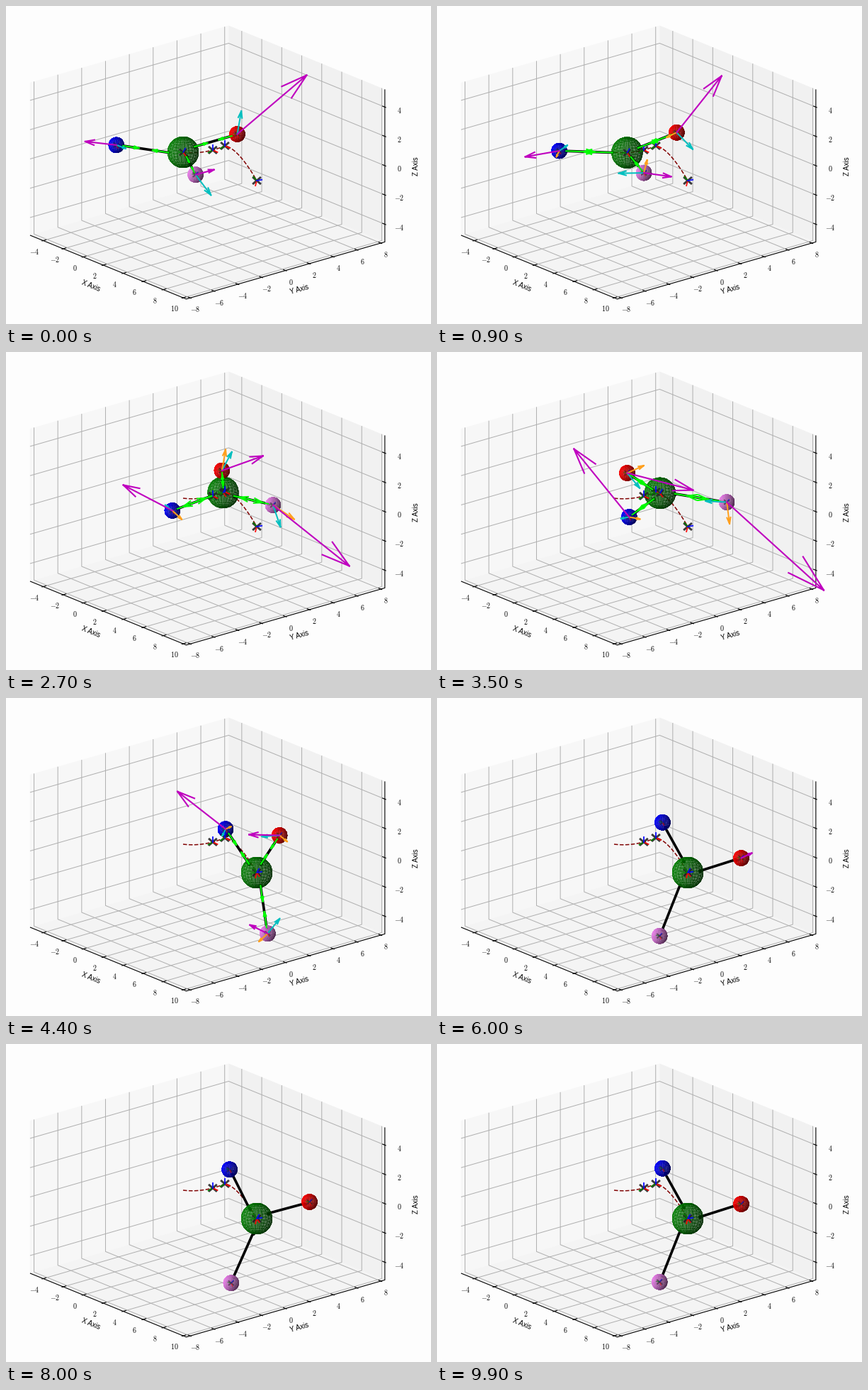
These frames come from a looping animation (600x448 px, 10 s). A matplotlib script:

```python
import numpy as np
import matplotlib.pyplot as plt
from matplotlib.animation import FuncAnimation
from matplotlib.collections import LineCollection, PolyCollection
from matplotlib.colors import to_rgb

W, H, DPI = 600, 448, 64
PT = 72 / DPI                      # points per pixel
FRAMES, STEP = 100, 100

plt.rcParams["mathtext.fontset"] = "cm"
fig = plt.figure(figsize=(W / DPI, H / DPI), dpi=DPI, facecolor="#fdfdfd")
ax = fig.add_axes([0, 0, 1, 1])
ax.set_xlim(0, W)
ax.set_ylim(H, 0)
ax.axis("off")

# Orthographic view, elevation 20, azimuth -40
SCALE = 21.96
CENTER = np.array([284.4, 220.2])
SE, CE = np.sin(np.radians(20)), np.cos(np.radians(20))
SA, CA = np.sin(np.radians(40)), np.cos(np.radians(40))


def screen(x, y, z):
    u = SA * x + CA * y
    v = SE * (CA * x - SA * y) - CE * z
    return SCALE * np.stack([u, v], axis=-1)


def project(x, y, z):
    return CENTER + screen(np.float64(x) - 2.5, np.float64(y), np.float64(z))


def track(times, values):
    """Smooth monotone curve through key values."""
    k, v = np.array(times, float), np.array(values, float)
    v = v.reshape(len(k), -1)
    d = np.diff(v, axis=0) / np.diff(k)[:, None]
    p = d[:-1] * d[1:]
    m = np.zeros_like(v)
    m[1:-1] = np.where(p > 0, 2 * p / np.where(p > 0, d[:-1] + d[1:], 1), 0)

    def at(t):
        i = int(np.clip(np.searchsorted(k, t, "right") - 1, 0, len(k) - 2))
        h = k[i + 1] - k[i]
        s = np.clip((t - k[i]) / h, 0, 1)
        return ((1 + 2 * s) * (1 - s) ** 2 * v[i] + s * (1 - s) ** 2 * h * m[i]
                + s * s * (3 - 2 * s) * v[i + 1] + s * s * (s - 1) * h * m[i + 1])

    return at


def rotate(vec, angle):
    c, s = np.cos(angle), np.sin(angle)
    return np.array([c * vec[0] - s * vec[1], s * vec[0] + c * vec[1]])


# Box, grid, ticks and labels; limits get a margin of 1/48
X0, X1 = -5 - 15 / 48, 10 + 15 / 48
Y0, Y1 = -8 - 16 / 48, 8 + 16 / 48
Z0, Z1 = -5 - 10 / 48, 5 + 10 / 48
XT, YT, ZT = range(-4, 11, 2), range(-8, 9, 2), range(-4, 5, 2)


def pane(corners, grey):
    pts = [project(*c) for c in corners]
    ax.add_patch(plt.Polygon(pts, fc=(grey,) * 3 + (0.5,), ec="none", zorder=0))


pane([(X0, Y0, Z0), (X0, Y1, Z0), (X0, Y1, Z1), (X0, Y0, Z1)], 0.95)
pane([(X0, Y1, Z0), (X1, Y1, Z0), (X1, Y1, Z1), (X0, Y1, Z1)], 0.90)
pane([(X0, Y0, Z0), (X1, Y0, Z0), (X1, Y1, Z0), (X0, Y1, Z0)], 0.925)

grid = [[(x, Y0, Z0), (x, Y1, Z0), (x, Y1, Z1)] for x in XT]
grid += [[(X1, y, Z0), (X0, y, Z0), (X0, y, Z1)] for y in YT]
grid += [[(X0, Y0, z), (X0, Y1, z), (X1, Y1, z)] for z in ZT]
ticks = [[(x, Y0 - 0.13, Z0), (x, Y0 + 0.27, Z0)] for x in XT]
ticks += [[(X1 + 0.13, y, Z0), (X1 - 0.26, y, Z0)] for y in YT]
ticks += [[(X1 + 0.13, Y1, z), (X1 - 0.26, Y1, z)] for z in ZT]
edges = [[(X0, Y0, Z0), (X1, Y0, Z0), (X1, Y1, Z0), (X1, Y1, Z1)]]
for lines, color, width in ((grid, "#b0b0b0", 1), (ticks + edges, "black", 1.1)):
    ax.add_collection(LineCollection([[project(*p) for p in l] for l in lines],
                                     colors=color, linewidths=width * PT, zorder=1))


def label(pos, text, size, **kw):
    ax.text(*pos, text, fontsize=size * PT, ha="center", va="center", **kw)


for x in XT:
    label(project(x, Y0, Z0) + (-12, 15.2), f"${x}$", 10)
for y in YT:
    label(project(X1, y, Z0) + (7.3, 16), f"${y}$", 10)
for z in ZT:
    label(project(X1, Y1, z) + (20, 4.3), f"${z}$", 10)
for pos, name, turn in (((120, 394), "X", -22), ((414, 399), "Y", 16), ((579.5, 225.5), "Z", 90)):
    label(pos, name + " Axis", 9.7, rotation=turn, family="Liberation Sans")


def path(q):
    """Planned route: a gentle arc for q in 0..1, then a drop for q in 1..2."""
    if q <= 1:
        return np.array([250 + 59 * q, 206 + 7 * q - 16 * q * q])
    r = q - 1
    return np.array([309 + 45 * r, 197 + 49 * r ** 1.6])


ax.plot(*np.transpose([path(q) for q in np.linspace(0, 2, 120)]), "--",
        color="#800000", lw=1.5 * PT, zorder=2)


class Cross:
    """Dark X with a small red, green and blue triad."""

    def __init__(self, size, turn=0, alpha=0.9):
        self.size = size
        self.body, = ax.plot([], [], color="#262626", lw=0.6 * size * PT, zorder=6, alpha=alpha)
        self.axes = [rotate((1.5 * size, 0), np.radians(a + turn)) for a in (25, 150, 270)]
        self.triad = [ax.plot([], [], color=c, lw=0.4 * size * PT, zorder=7, alpha=alpha)[0]
                      for c in ("red", "green", "blue")]

    def move(self, c):
        s = self.size
        self.body.set_data(c[0] + s * np.array([-1, 1, np.nan, -1, 1]),
                           c[1] + 0.85 * s * np.array([-1, 1, np.nan, 1, -1]))
        for line, d in zip(self.triad, self.axes):
            line.set_data([c[0], c[0] + d[0]], [c[1], c[1] + d[1]])


for q, turn in ((0.71, 0), (1, 0), (2, 80)):
    Cross(4.8, turn).move(path(q))


class Ball:
    """Translucent shaded sphere."""
    u, v = np.meshgrid(np.linspace(0, 2 * np.pi, 25), np.linspace(0, np.pi, 17))
    grid = np.stack([np.cos(u) * np.sin(v), np.sin(u) * np.sin(v), np.cos(v)], axis=-1)
    quads = np.stack([grid[:-1, :-1], grid[1:, :-1], grid[1:, 1:], grid[:-1, 1:]], axis=2)
    quads = quads.reshape(-1, 4, 3)
    mid = quads.mean(axis=1)
    order = np.argsort(mid @ [CE * CA, -CE * SA, SE])
    quads, mid = quads[order], mid[order]
    shade = 0.65 + 0.35 * (mid @ [-2 / 3, -2 / 3, 1 / 3])
    flat = screen(quads[..., 0], quads[..., 1], quads[..., 2])

    def __init__(self, radius, color):
        self.verts = self.flat * radius
        rgb = self.shade[:, None] * np.array(to_rgb(color))
        self.mesh = PolyCollection(self.verts, facecolors=np.c_[rgb, np.full(len(rgb), 0.42)],
                                   edgecolors="none", linewidths=0, antialiaseds=False, zorder=4)
        ax.add_collection(self.mesh)

    def move(self, c):
        self.mesh.set_verts(self.verts + c)


class Arrow:
    SPREAD = np.radians(16)

    def __init__(self, color, width, zorder):
        self.line, = ax.plot([], [], color=color, lw=width * PT, zorder=zorder)

    def set(self, tail, vec):
        if np.hypot(*vec) < 3:
            self.line.set_data([], [])
            return
        tip, gap = tail + vec, (np.nan, np.nan)
        left, right = (tip - 0.3 * rotate(vec, a) for a in (self.SPREAD, -self.SPREAD))
        self.line.set_data(*np.transpose([tail, tip, gap, left, tip, right]))


def spin(length, start, rate, t):
    """Arrow that turns steadily; angles in degrees."""
    return rotate((length, 0), np.radians(start + rate * t))


KEYS = (0, 1.9, 3.5, 4.4, 6)       # start, two way points, arrival, rest
progress = track(KEYS, (0, 0.81, 1.13, 2, 2))
fade = track((0, 4.4, 5.6), (1, 0.75, 0))
calm = track((0, 3.9, 5.6), (1, 1, 0))


class Agent:
    """Hangs on the load by a cable; offsets and forces are given at KEYS."""

    def __init__(self, color, offsets, forces, cyan, orange):
        self.offset = track(KEYS, offsets)
        self.force = track(KEYS + (7.5,), forces + [(0, 0)])
        self.spins = cyan, orange
        self.cable, = ax.plot([], [], "o-", color="black", lw=3.6 * PT, ms=4.8 * PT,
                              mew=0, zorder=3)
        self.ball = Ball(0.5, color)
        self.cross = Cross(3.2, 40, 0.6)
        self.pull = [Arrow("lime", 2, 8) for _ in range(2)]
        self.cyan = Arrow("#00bfbf", 2, 9)
        self.orange = Arrow("#ffa01e", 2, 9)
        self.magenta = Arrow("#bf00bf", 2.1, 10)

    def move(self, t, load, sway):
        arm = rotate(self.offset(t), 0.02 * sway)
        c, end = load + arm, load + 0.9 * arm
        hook = load + 0.22 * rotate(arm, 0.13 * sway)
        self.cable.set_data(*np.transpose([hook, end]))
        self.ball.move(c)
        self.cross.move(c)
        share = calm(t) * (0.35 + 0.5 * np.sin(np.pi * t / 4.8))
        self.pull[0].set(hook, share * (end - hook))
        self.pull[1].set(end, share * (hook - end))
        cyan, orange = self.spins
        self.cyan.set(c, fade(t) * spin(*cyan, t))
        self.orange.set(c, max(0, np.sin(np.pi * min(t / 5.2, 1))) * spin(*orange, t))
        self.magenta.set(c, self.force(t))


load_ball = Ball(1, "green")
load_cross = Cross(4.2, 30)
agents = [
    Agent("blue", [(-94, -12), (-98, 14), (-44, 33), (-43, -62), (-37, -70)],
          [(-44, -5), (-57, 24), (-78, -96), (-68, -53), (0, 0)],
          cyan=(14, 20, -60), orange=(18, 151, -40)),
    Agent("red", [(77, -24), (51, -33), (-46, -29), (33, -52), (75, -22)],
          [(98, -83), (23, -70), (93, 24), (-43, -1), (15, -7)],
          cyan=(33, -80, 140), orange=(30, -269, 70)),
    Agent("violet", [(17, 32), (40, 22), (94, 14), (14, 86), (-38, 90)],
          [(26, -7), (67, 35), (137, 124), (-25, -12), (0, 0)],
          cyan=(36, 53, 140), orange=(36, -131, 61)),
]


def update(i):
    t = i * STEP / 1000
    load = path(progress(t)[0])
    sway = np.cos(np.pi * (t - 6) / 2)
    load_ball.move(load)
    load_cross.move(load)
    for agent in agents:
        agent.move(t, load, sway)
    return []


anim = FuncAnimation(fig, update, frames=FRAMES, interval=STEP, repeat=True, repeat_delay=0)
plt.show()
```
